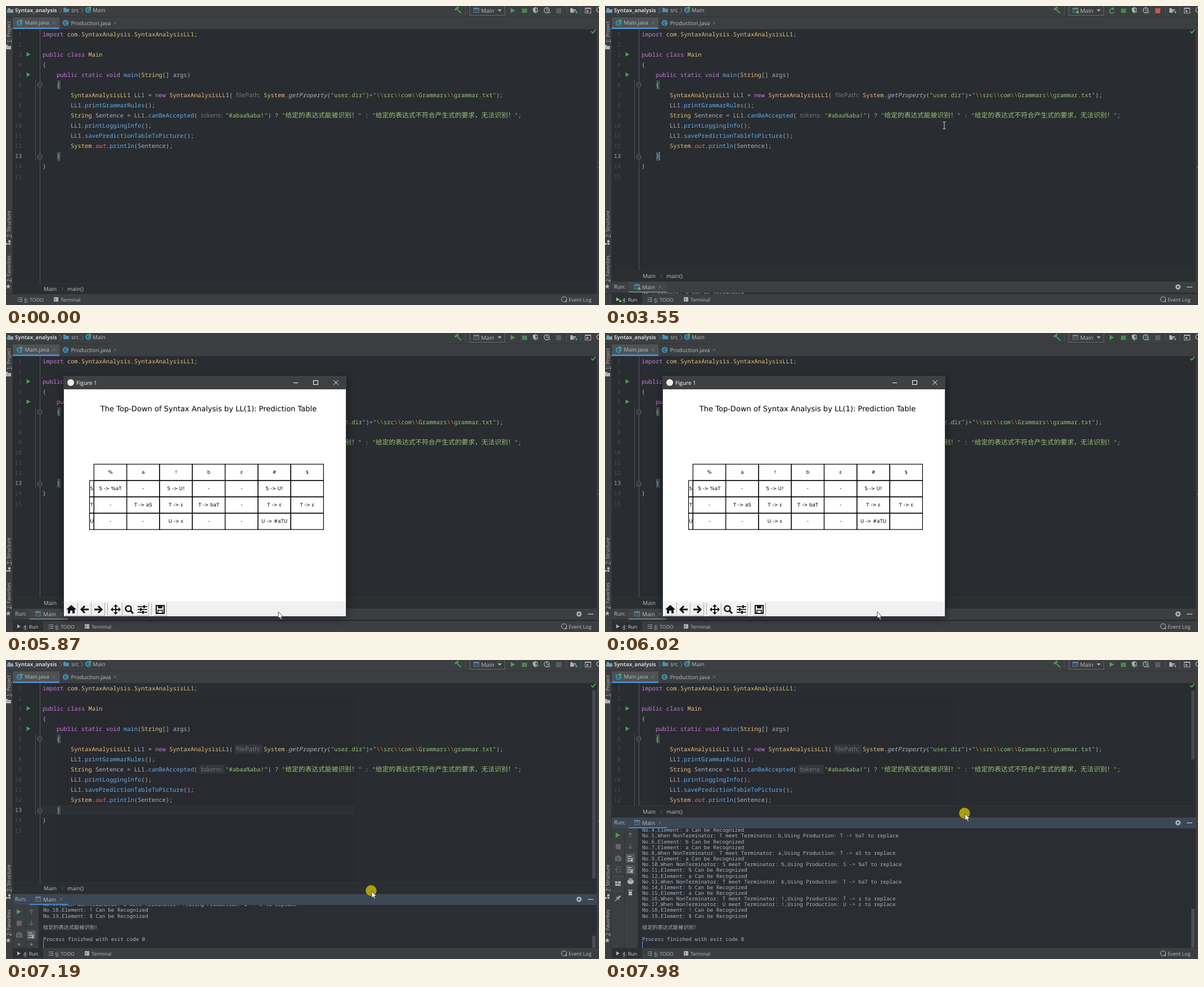
Animation, 1054 px wide and 531 px high, one loop 8000 ms. Source, as an HTML page with a canvas:

```html
<!DOCTYPE html>
<html lang="en">
<head>
<meta charset="utf-8">
<style>
html, body { margin: 0; width: 100%; height: 100%; overflow: hidden; background: #292c30; }
canvas { display: block; }
</style>
</head>
<body>
<canvas id="stage" width="1054" height="531"></canvas>
<script>
const g = document.getElementById('stage').getContext('2d');
g.textRendering = 'geometricPrecision';
const UI = '"Open Sans", "Noto Sans", sans-serif';
const MONO = '"Noto Sans Mono", monospace';
const CJK = '"Noto Sans CJK SC", "Noto Sans CJK", sans-serif';
const PLOT = '"DejaVu Sans", sans-serif';
const BAR = '#3c3f41', EDITOR = '#292c30', INK = '#bbbdbf', ICON = '#afb1b3', GREEN = '#499c54', BLUE = '#4a88c7';
const STYLE = {
  k: ['#c678dd'], c: ['#e5c07b'], t: ['#abb2bf'], f: ['#61afef'], s: ['#98c379'], e: ['#d0843f'],
  r: ['#e06c75', 'italic '], i: ['#abb2bf', 'italic '], z: ['#98c379', '', '11.75px ' + CJK]
};

// Each entry: x, line number, alternating style key and text.
const CODE = [
  [65, 1, 'k|import |c|com.SyntaxAnalysis.SyntaxAnalysisLL1|t|;'],
  [65, 3, 'k|public class |c|Main'],
  [65, 4, 't|{'],
  [90, 5, 'k|public static void |f|main|t|(|c|String|t|[] args)'],
  [90, 6, 't|{'],
  [115, 7, 'c|SyntaxAnalysisLL1 |t|LL1 = |k|new |c|SyntaxAnalysisLL1|t|('],
  [458, 7, 'c|System|t|.|i|getProperty|t|(|s|"user.dir"|t|)+|s|"|e|\\\\|s|src|e|\\\\|s|com|e|\\\\|s|Grammars|e|\\\\|s|grammar.txt"|t|);'],
  [115, 8, 't|LL1.|f|printGrammarRules|t|();'],
  [115, 9, 'c|String |t|Sentence = LL1.|f|canBeAccepted|t|('],
  [390, 9, 's|"#abaa%aba!"|t|) ? |s|"|z|给定的表达式能被识别！|s|"|t| : |s|"|z|给定的表达式不符合产生式的要求，无法识别！|s|"|t|;'],
  [115, 10, 't|LL1.|f|printLoggingInfo|t|();'],
  [115, 11, 't|LL1.|f|savePredictionTableToPicture|t|();'],
  [115, 12, 'c|System|t|.|r|out|t|.|f|println|t|(Sentence);'],
  [90, 13, 't|}'],
  [65, 14, 't|}']
];

// Parser log from No.4 on: a matched element, or "nonterminal terminal production".
const LOG = ['a', 'T b baT', 'b', 'a', 'T a aS', 'a', 'S % %aT', '%', 'a', 'T b baT', 'b', 'a', 'T ! ε', 'U ! ε', '!', '$']
  .map((step, i) => {
    const [n, term, body] = step.split(' ');
    return `No.${i + 4},` + (body
      ? `When NonTerminator: ${n} meet Terminator: ${term},Using Production: ${n} -> ${body} to replace`
      : `Element: ${n} Can be Recognized`);
  });

const TABLE = ['%|a|!|b|ε|#|$', 'S -> %aT|-|S -> U!|-|-|S -> U!|',
  '-|T -> aS|T -> ε|T -> baT|-|T -> ε|T -> ε', '-|-|U -> ε|-|-|U -> #aTU|'].map(row => row.split('|'));

const POINTER = [[140, 1012, 524], [220, 980, 500], [930, 921, 60], [1390, 905, 10], [2000, 905, 10], [2310, 603, 212],
  [4940, 603, 212], [5690, 484, 495], [6100, 484, 495], [6560, 641, 484], [6890, 641, 484], [7180, 650, 411], [7950, 640, 273]];
const PANEL_TOP = [[6890, 489], [7180, 416], [7950, 279]];

function tween(keys, t) {
  if (t <= keys[0][0]) return keys[0].slice(1);
  const i = keys.findIndex(key => key[0] > t);
  if (i < 0) return keys[keys.length - 1].slice(1);
  const a = keys[i - 1], b = keys[i], u = (t - a[0]) / (b[0] - a[0]);
  return a.slice(1).map((v, j) => v + (b[j + 1] - v) * u);
}

function rect(x, y, w, h, color) { g.fillStyle = color; g.fillRect(x, y, w, h); }
function frame(x, y, w, h, color, width = 1) { g.strokeStyle = color; g.lineWidth = width; g.strokeRect(x, y, w, h); }
function trace(points) {
  g.beginPath();
  for (let i = 0; i < points.length; i += 2) g.lineTo(points[i], points[i + 1]);
}
function line(color, width, ...points) { trace(points); g.strokeStyle = color; g.lineWidth = width; g.stroke(); }
function poly(color, ...points) { trace(points); g.closePath(); g.fillStyle = color; g.fill(); }
function disc(x, y, r, color) { g.beginPath(); g.arc(x, y, r, 0, 7); g.fillStyle = color; g.fill(); }
function ring(x, y, r, color, width = 1, from = 0, to = 6.3) {
  g.beginPath(); g.arc(x, y, r, from, to); g.strokeStyle = color; g.lineWidth = width; g.stroke();
}
// y is the middle of the capitals.
function text(str, x, y, size = 9.8, color = INK, family = UI, align = 'left', weight = '') {
  g.font = `${weight} ${size}px ${family}`;
  g.fillStyle = color;
  g.textAlign = align;
  g.fillText(str, x, Math.round(y + size * .36));
}
function clipped(x, y, w, h, paint) {
  g.save(); g.beginPath(); g.rect(x, y, w, h); g.clip(); paint(); g.restore();
}

const play = (x, y, color = GREEN, r = 4) => poly(color, x - r, y - r - .5, x + r, y, x - r, y + r + .5);
const cross = (x, y, r = 2.5, color = '#6e7275') => {
  line(color, 1, x - r, y - r, x + r, y + r);
  line(color, 1, x + r, y - r, x - r, y + r);
};
const folder = (x, y, color) => poly(color, x - 5, y - 4, x - 1, y - 4, x, y - 2, x + 5, y - 2, x + 5, y + 4, x - 5, y + 4);
function classIcon(x, y, runnable) {
  disc(x, y, 5.3, '#3f8aa8');
  text('C', x, y, 7.5, '#24353d', UI, 'center', 'bold');
  if (runnable) play(x + 4, y - 4, '#62b543', 2);
}
function appIcon(x, y, running) {
  frame(x - 4.5, y - 4.5, 9, 8, '#5f8096');
  rect(x - 5, y - 5, 10, 3, '#5f8096');
  line('#5f8096', 1, x - 2, y, x + 3, y);
  if (running) disc(x + 4, y + 3, 2.4, '#52c04f');
}
function bars(x, y) { for (let i = -3; i < 5; i += 3) { rect(x - 4, y + i, 2, 1, ICON); rect(x - 1, y + i, 5, 1, ICON); } }

function toolbar(t) {
  const running = t >= 2860 && t < 4640;
  rect(0, 0, 1054, 19, BAR);
  rect(0, 19, 1054, 1, '#323437');
  folder(8, 8, '#8f9ca6'); rect(2, 7, 5, 5, '#4fa3d1');
  text('Syntax_analysis', 16, 7.5, 9.5, '#d0d2d3', UI, 'left', 'bold');
  line('#77797b', 1, 95, 3, 99, 8, 95, 13);
  folder(107, 7, '#4f8fae');
  text('src', 116, 7.5, 10);
  line('#77797b', 1, 133, 3, 137, 8, 133, 13);
  classIcon(146, 7, true);
  text('Main', 154, 7.5);
  line(GREEN, 2, 802, 6, 809, 13);
  line(GREEN, 3.5, 798, 7, 804, 2);
  rect(816, 0, 1, 16, '#515456');
  frame(824.5, -2, 62, 18.5, '#65686a');
  appIcon(836, 8, running);
  text('Main', 844.5, 8, 10.1);
  poly(ICON, 874, 6, 881, 6, 877.5, 10);
  if (t >= 1310 && t < 2080) rect(893, 0, 20, 18, '#4c5053');
  if (running) {
    ring(901, 9, 4, GREEN, 1.8, .3, 5);
    poly(GREEN, 901, 2, 906, 5, 901, 8);
  } else play(901, 8);
  disc(921.5, 8.5, 3.8, GREEN);
  for (const dy of [-3, 0, 3]) line(GREEN, 1, 916.5, 8.5 + dy, 926.5, 8.5 + dy);
  line(BAR, .8, 920, 7.5, 923, 7.5); line(BAR, .8, 920, 10, 923, 10);
  poly(ICON, 936, 4, 941, 2, 945, 4, 945, 9, 941, 13, 937, 10);
  poly(BAR, 941, 4, 944, 5, 944, 8, 941, 11);
  play(944, 10, GREEN, 3);
  ring(961, 7.5, 4.5, ICON, 1.3);
  line(ICON, 1, 961, 4, 961, 8, 964, 8);
  play(966, 11, GREEN, 2.5);
  rect(978, 4, 9, 9, running ? '#c75450' : '#5b5e60');
  rect(996, 0, 1, 16, '#515456');
  folder(1008, 8, ICON); rect(1009, 8, 6, 6, BAR); rect(1010, 9, 2, 2, '#4fa3d1'); rect(1013, 9, 2, 4, '#4fa3d1');
  rect(1021, 0, 1, 16, '#515456');
  frame(1029.5, 3.5, 10, 9, ICON); rect(1029, 3, 11, 2, ICON); play(1034, 9, ICON, 2);
  ring(1054, 7, 4, ICON, 1.5);
}

function tabs() {
  rect(0, 20, 1054, 21, BAR);
  rect(12, 20, 83, 18, '#4e5254');
  rect(12, 38, 83, 3, BLUE);
  classIcon(24, 30, true);
  text('Main.java', 33.5, 30, 9.7);
  cross(85, 30);
  classIcon(106, 30);
  text('Production.java', 115.5, 30, 9.8);
  cross(194, 30);
}

function sideLabel(label, bottom) {
  g.save();
  g.translate(4.5, bottom);
  g.rotate(-Math.PI / 2);
  text(label, 0, 0, 8.8);
  line(INK, .8, 0, 5, 4.5, 5);
  g.restore();
}
function sideStrips() {
  rect(0, 20, 12, 492, BAR);
  rect(11, 20, 1, 492, '#323437');
  rect(1050, 41, 4, 471, BAR);
  sideLabel('1: Project', 65);
  folder(4, 73, ICON);
  sideLabel('7: Structure', 411);
  rect(0, 421, 3, 3, ICON); rect(4, 421, 4, 3, ICON); rect(4, 416, 4, 4, ICON);
  sideLabel('2: Favorites', 490);
  const star = [];
  for (let i = 0; i < 10; i++) {
    const r = i % 2 ? 2 : 5, a = i * Math.PI / 5 - Math.PI / 2;
    star.push(4 + r * Math.cos(a), 498 + r * Math.sin(a));
  }
  poly(ICON, ...star);
  rect(1052, 286, 2, 1, '#8a8d90');
}

const rowY = n => 50 + 18.06 * (n - 1);

function codeLine(x, n, markup) {
  const parts = markup.split('|');
  for (let i = 0; i < parts.length; i += 2) {
    const [color, slant = '', font = '10.44px ' + MONO] = STYLE[parts[i]];
    g.font = slant + font;
    g.fillStyle = color;
    g.textAlign = 'left';
    g.fillText(parts[i + 1], x, Math.round(rowY(n) + 3.7));
    x += g.measureText(parts[i + 1]).width;
  }
}
function hint(label, x, y, w, boxed) {
  if (boxed) rect(x - 3, y - 8, w, 16, '#33363a');
  text(label, x, y - .5, 11.3, '#74777b');
}
function fold(y, dir) {
  poly(EDITOR, 56, y - 4, 64, y - 4, 64, y + 4, 56, y + 4);
  line('#686c70', 1, 56.5, y - 4 * dir, 63.5, y - 4 * dir, 63.5, y + 1.5 * dir, 60, y + 4.5 * dir, 56.5, y + 1.5 * dir, 56.5, y - 4 * dir);
  line('#686c70', 1, 58, y, 62, y);
}

function editor(t, top) {
  const bottom = top - 20, refreshed = t >= 6890;
  rect(12, 41, 1038, bottom - 41, EDITOR);
  clipped(12, 41, 1038, bottom - 41, () => {
    if (refreshed) {
      rect(91, 68, 528, 436, '#282a2f');
      rect(61, 258, 558, 17, '#2d3035');
    }
    rect(60, 41, 1, 471, '#55595c');
    rect(52, 131, 1, 144, '#48544e');
    for (let n = 1; n <= 15; n++)
      text(n, 28, rowY(n), 10.2, n === 13 ? '#a4a9b1' : '#4a4f57', MONO, 'right');
    play(40, 86, GREEN, 3.5);
    play(40, 122, GREEN, 3.5);
    fold(141, 1);
    fold(267, -1);
    for (const y of [132, 259]) rect(91, y, 6, 16, '#3b514d');
    CODE.forEach(entry => codeLine(...entry));
    hint('filePath:', 409, 158, 50, refreshed);
    hint('tokens:', 346.5, 194, 45, refreshed);
    if ((t >= 2160 && t < 2860) || (t >= 3170 && t < 3630) || (t >= 4180 && t < 4640)) rect(96, 259, 1.5, 15, '#528bff');
    line('#499c54', 2, 1040, 45, 1043, 48, 1048, 42);
    if (refreshed) {
      const view = bottom - 41;
      rect(1042, 54, 6, Math.min(1, view / 356) * (view - 18), '#46494c');
    }
  });
  rect(12, bottom, 1038, 20, '#2b2e31');
  rect(12, bottom, 1038, 1, '#323538');
  text('Main', 67, top - 10, 9.9);
  line('#5f6264', 1, 99, top - 13, 101, top - 10, 99, top - 7);
  text('main()', 109, top - 10, 9.8);
}

function runPanel(t, top) {
  const focused = t >= 6890, running = t < 3930, y0 = top + 20;
  rect(12, top, 1038, 20, focused ? '#3b4754' : BAR);
  rect(12, top, 1038, 1, '#34383b');
  text('Run:', 16, top + 10, 9.7);
  if (!focused) rect(42, top + 1, 68, 17, '#414547');
  appIcon(57, top + 10, running);
  text('Main', 66, top + 10, 9.9);
  cross(98, top + 10);
  rect(42, top + 18, 68, 2, focused ? BLUE : '#787d82');
  ring(1018.5, top + 10, 3, ICON, 2.4);
  for (let a = 0; a < 6.2; a += Math.PI / 4)
    line(ICON, 1.6, 1018.5 + 3 * Math.cos(a), top + 10 + 3 * Math.sin(a), 1018.5 + 5 * Math.cos(a), top + 10 + 5 * Math.sin(a));
  rect(1034, top + 9.5, 10, 1.5, ICON);
  rect(12, y0, 1038, 512 - y0, '#2a2d32');
  clipped(12, y0, 1038, 512 - y0, () => {
    if (t >= 3550 && t < 3630) text(LOG[3], 66, 508, 9.17, '#abb2bf', MONO);
    if (!focused) return;
    rect(12, y0, 46, 512, BAR);
    rect(34, y0, 1, 512, '#323538');
    consoleTools(top);
    LOG.forEach((entry, i) => text(entry, 66, 302 + 10.15 * i, 9.17, '#abb2bf', MONO));
    text('给定的表达式能被识别！', 66, 475, 9.2, '#abb2bf', CJK);
    text('Process finished with exit code 0', 66, 495.5, 9.17, '#abb2bf', MONO);
    rect(66, 500, 1.2, 11, '#528bff');
    rect(1042, 490 - (416 - top) * .35, 6, 21 + (416 - top) * .35, '#4a4d51');
  });
}

function consoleTools(top) {
  const dim = '#64676a', arrow = (x, y, d) => {
    line(dim, 1.5, x, y - 4, x, y + 4);
    line(dim, 1.5, x - 3, y + d, x, y + 4 * d, x + 3, y + d);
  };
  const lines = (x, y) => {
    rect(x - 8, y - 8, 16, 16, '#55595c');
    for (const dy of [-4, 0, 4]) rect(x - 5, y + dy, dy ? 7 : 10, 1.3, '#c5c7c8');
    poly('#c5c7c8', x, y + 4, x + 4, y + 1, x + 4, y + 7);
  };
  const left = [
    [32, (x, y) => play(x, y)],
    [52, (x, y) => rect(x - 4, y - 4, 9, 9, dim)],
    [73, (x, y) => { rect(x - 5, y - 3, 11, 8, dim); rect(x - 2, y - 5, 5, 3, dim); ring(x, y + 1, 2, BAR); }],
    [93, (x, y) => { frame(x - 2.5, y - 4.5, 7, 9, dim); line(dim, 1.3, x - 6, y, x + 1, y); }],
    [118, (x, y) => { rect(x - 5, y - 4, 4, 4, ICON); rect(x, y - 4, 5, 4, ICON); rect(x - 5, y + 1, 10, 3, ICON); rect(x - 10, y - 13, 20, 1, '#515456'); rect(x - 10, y + 13, 20, 1, '#515456'); }],
    [144, (x, y) => { line(ICON, 3, x, y, x + 4, y - 4); line(ICON, 1.3, x - 3, y - 2, x + 2, y + 3); line(ICON, 1.3, x - 5, y + 5, x, y); }]
  ];
  const right = [
    [32, (x, y) => arrow(x, y, -1)],
    [52, (x, y) => arrow(x, y, 1)],
    [73, lines],
    [93, lines],
    [114, (x, y) => { rect(x - 5, y - 2, 11, 5, ICON); rect(x - 3, y - 5, 7, 2, ICON); rect(x - 3, y + 2, 7, 3, ICON); }],
    [134, (x, y) => { rect(x - 4, y - 5, 8, 1.5, ICON); rect(x - 3, y - 2, 6, 7, ICON); }]
  ];
  [[23, left], [45, right]].forEach(([x, icons]) => {
    const fitting = icons.filter(([dy]) => top + dy < 494);
    fitting.forEach(([dy, paint]) => paint(x, top + dy));
    if (fitting.length < icons.length) text('»', x, 504, 11, ICON, UI, 'center');
  });
}

function statusBar(t) {
  const opened = t >= 2860, shift = opened ? 55 : 0;
  rect(0, 512, 1054, 19, BAR);
  rect(0, 511, 1054, 1, '#323437');
  if (opened) {
    rect(12, 512, 54, 17, '#2d3032');
    play(23, 521, ICON, 3);
    if (t < 3930) disc(27, 524, 2.3, '#52c04f');
    text('4: Run', 31, 521.5, 8.9, '#d0d2d3');
    line(INK, .8, 31.5, 526.5, 36, 526.5);
  }
  bars(25 + shift, 521);
  text('6: TODO', 32.5 + shift, 521.5, 8.8);
  line(INK, .8, 33 + shift, 526.5, 37 + shift, 526.5);
  rect(85 + shift, 517, 8, 8, ICON);
  line(BAR, 1, 86.5 + shift, 519, 88.5 + shift, 521, 86.5 + shift, 523);
  text('Terminal', 97 + shift, 521.5, 8.7);
  ring(992, 521, 4.5, ICON, 1.2);
  poly(ICON, 993, 525, 997, 526, 996, 522);
  text('Event Log', 1000, 521.5, 9);
}

function figureWindow() {
  g.save();
  g.shadowColor = 'rgba(0,0,0,.45)';
  g.shadowBlur = 14;
  g.shadowOffsetY = 3;
  rect(102, 76, 503, 428, '#3d4144');
  g.restore();
  rect(103, 100, 501, 377, '#fff');
  rect(103, 477, 501, 26, '#f0f0f0');
  disc(115, 88, 6, '#f1ece4');
  text('Figure 1', 125, 88.5, 9.9, '#fff');
  rect(511, 88, 8, 1, '#fff');
  frame(546.5, 84.5, 8, 7, '#fff');
  cross(586.5, 88, 4, '#fff');
  text('The Top-Down of Syntax Analysis by LL(1): Prediction Table', 360, 134, 13.06, '#000', PLOT, 'center');
  const colW = 58.3, rowH = 29;
  TABLE.forEach((row, r) => {
    const y = 233 + r * rowH;
    row.forEach((cell, c) => {
      frame(156.3 + c * colW, y, colW, rowH, '#000', 1.2);
      text(cell, 185.5 + c * colW, y + 13.5, 8.6, '#000', PLOT, 'center');
    });
    if (r) {
      frame(148.5, y, 7.8, rowH, '#000', 1.2);
      text('STU'[r - 1], 152.3, y + 13.5, 8.6, '#000', PLOT, 'center');
    }
  });
  for (const x of [116, 140, 164, 195, 219, 242, 274]) {
    line('#a8a8a8', 1, x - 11, 502, x + 11.5, 502, x + 11.5, 479);
    line('#fff', 1, x - 11.5, 502, x - 11.5, 479.5, x + 11, 479.5);
  }
  for (const x of [180, 258]) line('#a8a8a8', 1, x + .5, 480, x + .5, 501);
  const ink = '#111', y = 491;
  poly(ink, 107, y, 116, y - 8, 125, y, 122, y, 122, y + 7, 118, y + 7, 118, y + 2, 114, y + 2, 114, y + 7, 110, y + 7, 110, y);
  for (const [x, d] of [[140, -1], [164, 1]]) {
    line(ink, 3, x - 7 * d, y, x + 5 * d, y);
    line(ink, 3, x, y - 6, x + 6 * d, y, x, y + 6);
  }
  line(ink, 2, 188, y, 202, y);
  line(ink, 2, 195, y - 7, 195, y + 7);
  for (const [dx, dy] of [[1, 0], [-1, 0], [0, 1], [0, -1]])
    poly(ink, 195 + dx * 9, y + dy * 9, 195 + dx * 5 + dy * 4, y + dy * 5 + dx * 4, 195 + dx * 5 - dy * 4, y + dy * 5 - dx * 4);
  ring(217.5, y - 1.5, 5, ink, 2.5);
  line(ink, 3, 221, y + 2, 226, y + 7);
  [[-5, 3], [0, -3], [5, 1]].forEach(([dy, dx]) => { rect(234, y + dy - .8, 17, 1.6, ink); rect(241 + dx, y + dy - 2.5, 3, 5, ink); });
  frame(267, y - 7, 14, 14, ink, 2);
  rect(270, y - 7, 8, 5, ink);
  frame(270, y + 1.5, 8, 5.5, ink, 1.6);
}

function pointer(t, top) {
  if (t < 140) return;
  const [x, y] = tween(POINTER, t);
  if ((t >= 1850 && t < 2000) || t >= 6890) disc(x - 1, y - 1, 9.7, 'rgba(190,178,10,.86)');
  if (t >= 5480 && t < 5790) {
    ring(x, y, 5.7, '#1583dc', 3.6);
    ring(x, y, 5.7, '#45b0f5', 2, t / 180, t / 180 + 1.6);
  } else if (t < 5790 && y > 41 && y < top - 20) {
    line('#d6d8da', 1, x - 2.5, y - 6, x + 2.5, y - 6);
    line('#d6d8da', 1, x, y - 6, x, y + 6);
    line('#d6d8da', 1, x - 2.5, y + 6, x + 2.5, y + 6);
  } else {
    const arrow = [0, 0, 0, 12, 2.8, 9.5, 4.7, 14, 6.6, 13.2, 4.8, 9, 8.5, 9].map((v, i) => v + (i % 2 ? y : x));
    poly('#fff', ...arrow);
    line('#222', .8, ...arrow, x, y);
  }
}

function draw(now) {
  const t = now % 8000, tick = 77.35;
  const step = t < 140 ? t : 144 + Math.floor((t - 135) / tick) * tick;
  const top = t < 3010 ? 512 : Math.round(tween(PANEL_TOP, step)[0]);
  editor(t, top);
  if (t >= 3010) runPanel(t, top);
  tabs();
  sideStrips();
  toolbar(t);
  statusBar(t);
  if (t >= 5790 && t < 6890) figureWindow();
  pointer(step, top);
}

function loop() {
  draw(performance.now());
  requestAnimationFrame(loop);
}
loop();
</script>
</body>
</html>
```
